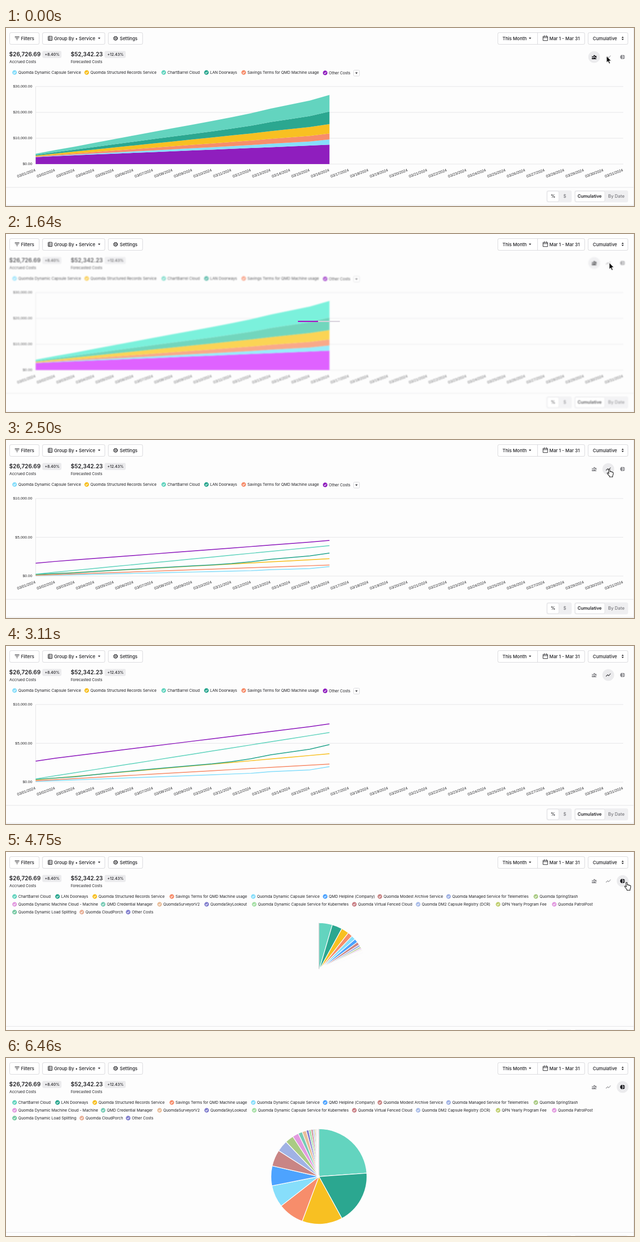
Write an HTML page that moves like this. It is 1280x365 px and loops after 6.49 s.

```html
<!DOCTYPE html>
<html lang="en">
<head>
<meta charset="utf-8">
<title>Cost report</title>
<style>
  html, body { margin: 0; width: 100%; height: 100%; overflow: hidden; background: #fdfdfd; }
  svg { display: block; width: 1280px; height: 365px; }
  text { font-family: Inter, sans-serif; font-size: 7.8px; fill: #1f1f23; white-space: pre; }
  .ui text { font-size: 9.2px; font-weight: 500; }
  .big { font-size: 11.5px; font-weight: 600; }
  .badge { font-weight: 500; }
  .axis text { font-family: "Liberation Sans", Arial, sans-serif; fill: #2a2a2d; }
  .foot text { font-size: 9px; font-weight: 500; text-anchor: middle; }
  .foot .on { font-weight: 600; }
  .foot .off { fill: #77777c; }
  .box { fill: #fff; stroke: #d8d8dc; }
  .ui .box { filter: drop-shadow(0 .8px .4px rgba(0, 0, 0, .14)); }
  .tab { fill: #fff; stroke: #e0e0e3; }
  .rule { stroke: #e4e4e6; fill: none; }
  .ink { fill: none; stroke: #1f1f23; stroke-width: 1.1; stroke-linecap: round; stroke-linejoin: round; }
  .halo { fill: #ebebed; visibility: hidden; }
  .tool { color: #8c8c90; }
  .tool.on { color: #1f1f23; }
  .tool.on .halo { visibility: visible; }
  .loading { filter: blur(1.2px); }
  .loading .soft { opacity: .72; }
  .hide { display: none; }
</style>
</head>
<body>
<svg viewBox="0 0 1280 365">
  <path class="rule" d="M1279.5 0V365"/>

  <g class="ui">
    <g class="box">
      <rect x="7.5" y="9.5" width="60" height="24" rx="3"/>
      <rect x="74.5" y="9.5" width="127" height="24" rx="3"/>
      <rect x="208.5" y="9.5" width="70" height="24" rx="3"/>
      <rect x="1002.5" y="9.5" width="177" height="24" rx="3"/>
      <rect x="1186.5" y="9.5" width="81" height="24" rx="3"/>
      <path d="M1083.5 9.5v24"/>
    </g>
    <path class="ink" d="M18.4 18.4h8.4M20.1 21.2h5M21.8 24h1.6"/>
    <rect class="ink" x="86" y="17" width="8" height="8.4" rx="1"/>
    <path class="ink" d="M88.8 17v8.4M91 19.4h1M91 21.2h1M91 23h1M86.4 19.8h2M86.4 22.6h2" style="stroke-width:.9"/>
    <circle class="ink" cx="223.4" cy="21.2" r="3.2"/>
    <circle class="ink" cx="223.4" cy="21.2" r="4.1" style="stroke-dasharray:1.6 1.62;stroke-linecap:butt"/>
    <circle class="ink" cx="223.4" cy="21.2" r="1.1" style="stroke-width:.9"/>
    <path class="ink" d="M1095 17.2h9v8.6h-9zM1095 19.8h9M1097.4 15.8v2M1101.6 15.8v2" style="stroke-width:1"/>
    <path d="M187.4 19.8h5l-2.5 2.8zM1065.6 19.8h5l-2.5 2.8zM1254.6 20.2h4.6l-2.3-2.7zM1254.6 22.3h4.6l-2.3 2.7z" fill="#1f1f23"/>
    <text x="30.4" y="24.6">Filters</text>
    <text x="98" y="24.6">Group By • Service</text>
    <text x="232" y="24.6">Settings</text>
    <text x="1012" y="24.6">This Month</text>
    <text x="1107.5" y="24.6">Mar 1 - Mar 31</text>
    <text x="1196" y="24.6">Cumulative</text>
  </g>

  <g id="main">
    <g class="soft">
      <rect x="74" y="47" width="39" height="14.5" rx="3" fill="#ebebed"/>
      <rect x="201" y="47" width="43" height="14.5" rx="3" fill="#ebebed"/>
      <text class="big" x="6.6" y="58.3">$26,726.69</text>
      <text class="big" x="132" y="58.3">$52,342.23</text>
      <text class="badge" x="79" y="57.2">+8.40%</text>
      <text class="badge" x="206.5" y="57.2">+12.43%</text>
      <text x="7" y="72.2">Accrued Costs</text>
      <text x="132" y="72.2">Forecasted Costs</text>

      <g class="tool" transform="translate(1198.8 59.5)">
        <circle class="halo" r="12"/>
        <path transform="scale(.52) translate(-12 -11.5)" d="M3 13v7h18v-1.5l-9-7L8 17zM3 7l4 3 5-7 5 4h4v8.97l-9.4-7.31-3.98 5.48L3 10.44z" fill="currentColor"/>
      </g>
      <g class="tool" transform="translate(1227.6 59.5)">
        <circle class="halo" r="12"/>
        <path transform="scale(.52) translate(-12 -12)" d="M3.5 18.49l6-6.01 4 4L22 6.92l-1.41-1.41-7.09 7.97-4-4L2 16.99z" fill="currentColor"/>
      </g>
      <g class="tool" transform="translate(1256.8 59.5)">
        <circle class="halo" r="12"/>
        <path d="M-.5 -4.6A4.6 4.6 0 0 0 -.5 4.6zM.6 -4.6A4.6 4.6 0 0 1 4.7 -.5H.6zM.6 .6H4.7A4.6 4.6 0 0 1 .6 4.6z" fill="currentColor"/>
      </g>
    </g>

    <g id="timeView">
      <g id="shortKey" class="soft">
        <rect class="box" x="708.5" y="86.5" width="12" height="12" rx="2"/>
        <path d="M711.8 91.2h5l-2.5 2.8z" fill="#1f1f23"/>
      </g>
      <g id="axis" class="axis soft"></g>
      <g id="areas"></g>
      <g id="lines" class="soft" fill="none" stroke-width="1.7" stroke-linejoin="round"></g>
    </g>
    <g id="pieView">
      <g id="fullKey"></g>
      <g id="pie" stroke="#fdfdfd" stroke-width="1.3" stroke-linejoin="round"></g>
      <path d="M638 145.5V240" stroke="#a9a9ac" stroke-width=".8"/>
    </g>

    <g id="foot" class="foot soft">
      <path class="rule" d="M0 326.8H1279M0 363.5H1279"/>
      <rect x="1101.5" y="333" width="51.5" height="24.5" rx="4" fill="#efeff1"/>
      <rect x="1158.5" y="333" width="109.5" height="24.5" rx="4" fill="#efeff1"/>
      <rect class="tab" x="1103" y="334.5" width="24" height="21.5" rx="3"/>
      <rect class="tab" x="1160" y="334.5" width="60.5" height="21.5" rx="3"/>
      <text class="on" x="1115" y="348.4">%</text>
      <text class="off" x="1139" y="348.4">$</text>
      <text class="on" x="1189.5" y="348.4">Cumulative</text>
      <text class="off" x="1244" y="348.4">By Date</text>
    </g>
  </g>

  <g id="loader">
    <rect x="595" y="178" width="85.5" height="2.4" fill="#d8d2dc"/>
    <rect id="bar" y="178" height="2.4" fill="#a30cc4"/>
  </g>

  <g id="cursor">
    <path id="arrow" d="M0 0V13.6L3.1 10.8 5.2 15.8 7.6 14.8 5.5 9.9H9.7z" fill="#111" stroke="#fff" stroke-width="1" stroke-linejoin="round"/>
    <path id="hand" d="M-1.4 1.8C-1.4 .3 1 .3 1.1 1.8L1.5 6.2C2 5.3 3.6 5.4 3.8 6.6 4.5 5.8 5.9 6.2 6 7.4 7 6.8 8.3 7.4 8.3 8.8 8.3 12 7.8 13.2 7 14.6V17H.6V15.4C-1 13.8-2.4 11.8-3.8 10-4.7 8.7-3.2 7.6-2 8.7L-.7 10z" fill="#fff" stroke="#111" stroke-width="1.1" stroke-linejoin="round"/>
  </g>
</svg>

<script>
const LOOP = 6490;
const LOADS = [[1365, 2290], [4200, 4700]];
const GROW = 1000;
const X0 = 60.5, STEP = 39.92, BASE = 279, HEIGHT = 159;

const $ = id => document.getElementById(id);
const add = (parent, tag, attrs, text) => {
  const el = document.createElementNS("http://www.w3.org/2000/svg", tag);
  for (const k in attrs) el.setAttribute(k, attrs[k]);
  if (text) el.textContent = text;
  return parent.appendChild(el);
};
const show = (el, on) => el.classList.toggle("hide", !on);
const clamp = v => Math.max(0, Math.min(1, v));
const outQuart = v => 1 - (1 - clamp(v)) ** 4;

// name, colour, legend x, legend row, slice in degrees
const services = [
  ["ChartBarrel Cloud", "#63d4bf", 17.5, 0, 86],
  ["LAN Doorways", "#2ba790", 105, 0, 65.4],
  ["Quomda Structured Records Service", "#f8c022", 181, 0, 49],
  ["Savings Terms for QMD Machine usage", "#f78d6b", 338, 0, 31.5],
  ["Quomda Dynamic Capsule Service", "#87defb", 504, 0, 26.8],
  ["QMD Helpline (Company)", "#4da3ff", 650.5, 0, 24.2],
  ["Quomda Modest Archive Service", "#c98585", 762, 0, 20],
  ["Quomda Managed Service for Telemetries", "#a0b2e4", 902, 0, 13.8],
  ["Quomda SpringStash", "#aacb84", 1080, 0, 10.3],
  ["Quomda Dynamic Machine Cloud - Machine", "#e29be0", 17.5, 1, 7.5],
  ["QMD Credential Manager", "#77cbb5", 198, 1, 5],
  ["QuomdaSurveyorV2", "#e8bd9a", 313, 1, 5],
  ["QuomdaSkyLookout", "#8380cf", 409, 1, 3.2],
  ["Quomda Dynamic Capsule Service for Kubernetes", "#a5dfa5", 506, 1, 2.8],
  ["Quomda Virtual Fenced Cloud", "#c97f85", 710, 1, 2.2],
  ["Quomda DM2 Capsule Registry (DCR)", "#a9bce8", 840, 1, 1.8],
  ["QPN Yearly Program Fee", "#c0cf70", 1003, 1, 1.5],
  ["Quomda PatrolPost", "#e29be0", 1117.5, 1, 1.2],
  ["Quomda Dynamic Load Splitting", "#77c9a4", 17.5, 2, 1],
  ["Quomda CloudPorch", "#e8b098", 154.5, 2, .9],
  ["Other Costs", "#8380cf", 249, 2, .9]
];

// colour, colour while loading, cumulative cost as [day, value] anchors; bottom of the stack first
const series = [
  ["#8f1ebe", "#df62ff", [[0, 2700], [1, 3080], [14, 7150], [15, 7516]]],
  ["#87defb", "#98ecfb", [[0, 90], [11, 1132], [12, 1340], [14, 1572], [15, 1990]]],
  ["#f78d6b", "#f9a98a", [[0, 160], [15, 2327]]],
  ["#f8c022", "#fbd455", [[0, 283], [15, 3655]]],
  ["#2ba790", "#72d6bd", [[0, 346], [2, 690], [4, 1226], [7, 1918], [9, 2358], [10, 2641], [11, 3019], [12, 3522], [14, 4245], [15, 4843]]],
  ["#63d4bf", "#7bf1dc", [[0, 409], [15, 6395]]]
];

// piecewise linear lookup
function valueAt(points, at) {
  const i = Math.max(1, points.findIndex(p => p[0] >= at));
  const [a, b] = [points[i - 1], points[i]];
  return a[1] + (b[1] - a[1]) * (at - a[0]) / (b[0] - a[0]);
}
const days = [...Array(16).keys()];
const costs = series.map(s => days.map(d => valueAt(s[2], d)));
const plot = (values, max, grow = 1) =>
  values.map((v, d) => (X0 + d * STEP).toFixed(2) + "," + (BASE - v / max * HEIGHT * grow).toFixed(2));

function addKey(parent, name, color, x, y) {
  add(parent, "circle", { cx: x, cy: y + .3, r: 4.7, fill: color });
  add(parent, "path", {
    d: `M${x - 2.2} ${y + .5}l1.5 1.5 2.9-3.1`, fill: "none", stroke: "#fff", "stroke-width": 1.1
  });
  add(parent, "text", { x: x + 7.5, y: y + 2.9 }, name);
}

for (const [name, color, x, row] of services) addKey($("fullKey"), name, color, x, 91 + row * 16);
const slices = services.map(s => add($("pie"), "path", { fill: s[1] }));

[[4, 17.5], [2, 164.5], [0, 321.5], [1, 408.5], [3, 484.5]].forEach(([i, x]) =>
  addKey($("shortKey"), services[i][0], services[i][1], x, 91));
addKey($("shortKey"), "Other Costs", "#8f1ebe", 650.5, 91.7);

// axes: one set of value labels per chart type
const axis = $("axis");
function addScale(max, parts) {
  const g = add(axis, "g", {});
  for (let i = 0; i <= parts; i++) {
    const y = BASE - HEIGHT * i / parts;
    const label = "$" + (max * i / parts).toLocaleString("en-US", { minimumFractionDigits: 2 });
    add(g, "path", { class: "rule", d: `M${X0} ${y}H1258` });
    add(g, "text", { x: 53.5, y: y + 2.2, "text-anchor": "end" }, label);
  }
  return g;
}
const areaScale = addScale(30000, 3), lineScale = addScale(10000, 2);
add(axis, "path", { class: "rule", d: `M${X0} ${BASE - HEIGHT}V${BASE}` });
for (let d = 0; d < 31; d++) {
  add(axis, "text", {
    transform: `translate(${X0 + d * STEP} 293.6) rotate(-20)`, "text-anchor": "end"
  }, `03/${String(d + 1).padStart(2, "0")}/2024`);
}

let floor = days.map(() => 0);
const areas = costs.map((c, i) => {
  const top = floor.map((v, d) => v + c[d]);
  const points = [...plot(top, 30000), ...plot(floor, 30000).reverse()].join(" ");
  floor = top;
  return add($("areas"), "polygon", { points, fill: series[i][0] });
});
const lines = series.map(s => add($("lines"), "polyline", { stroke: s[0] }));

function drawLines(grow) {
  lines.forEach((el, i) => el.setAttribute("points", plot(costs[i], 10000, grow).join(" ")));
}

function drawPie(grow) {
  const cx = 637.8, cy = 243, r = 97.8;
  const total = services.reduce((sum, s) => sum + s[4], 0);
  const point = a => `${(cx + r * Math.sin(a)).toFixed(2)} ${(cy - r * Math.cos(a)).toFixed(2)}`;
  let from = 0;
  slices.forEach((el, i) => {
    const to = from + services[i][4] / total * Math.PI * 2 * grow;
    el.setAttribute("d", `M${cx} ${cy}L${point(from)}A${r} ${r} 0 0 1 ${point(to)}Z`);
    from = to;
  });
}

// cubic-bezier(.65, .815, .735, .395)
function barEase(x) {
  const curve = (s, a, b) => 3 * (1 - s) ** 2 * s * a + 3 * (1 - s) * s * s * b + s ** 3;
  let lo = 0, hi = 1;
  for (let i = 0; i < 20; i++) {
    const mid = (lo + hi) / 2;
    if (curve(mid, .65, .735) < x) lo = mid; else hi = mid;
  }
  return curve(lo, .815, .395);
}

function drawLoader(elapsed) {
  const p = barEase(clamp(elapsed / 1260));
  const left = clamp(-.35 + 1.35 * p), right = clamp(1.9 * p);
  $("bar").setAttribute("x", 595 + 85.5 * left);
  $("bar").setAttribute("width", 85.5 * Math.max(0, right - left));
}

// time, x, y of the pointer
const track = [
  [0, 1224, 57.5], [260, 1229.5, 58.8], [2700, 1229.5, 58.8], [2950, 1290, 64],
  [3800, 1290, 66], [4030, 1265, 61.5], [LOOP, 1265, 61.5]
];
function drawCursor(t, loading) {
  const i = track.findIndex(k => k[0] > t);
  const [a, b] = [track[i - 1], track[i]];
  const u = (t - a[0]) / (b[0] - a[0]), e = u * u * (3 - 2 * u);
  const hand = !loading && ((t > 160 && t < 2760) || t > 4000);
  $("cursor").setAttribute("transform", `translate(${a[1] + (b[1] - a[1]) * e} ${a[2] + (b[2] - a[2]) * e})`);
  show($("cursor"), t < 2960 || (t > 3800 && t < 4050) || (t > 4200 && t < 5300));
  show($("hand"), hand);
  show($("arrow"), !hand);
}

const tools = document.querySelectorAll(".tool");
function draw(t) {
  const load = LOADS.find(([a, b]) => t >= a && t < b);
  const view = LOADS.filter(l => t >= l[1]).length;
  const hover = load ? -1 : t > 160 && t < 2760 ? 1 : t > 3990 && t < 5300 ? 2 : -1;

  $("main").classList.toggle("loading", !!load);
  tools.forEach((el, i) => el.classList.toggle("on", i === view || i === hover));
  show($("timeView"), view < 2);
  show($("pieView"), view === 2);
  show($("areas"), view === 0);
  show(areaScale, view === 0);
  show($("lines"), view === 1);
  show(lineScale, view === 1);
  $("foot").setAttribute("transform", `translate(0 ${view === 2 ? 30.8 : 0})`);
  areas.forEach((el, i) => el.setAttribute("fill", series[i][load ? 1 : 0]));

  if (view === 1) drawLines(outQuart((t - LOADS[0][1]) / GROW));
  if (view === 2) drawPie(outQuart((t - LOADS[1][1]) / GROW));
  show($("loader"), !!load);
  if (load) drawLoader(t - load[0]);
  drawCursor(t, !!load);
}

const start = performance.now();
function tick() {
  draw((performance.now() - start) % LOOP);
  requestAnimationFrame(tick);
}
tick();
</script>
</body>
</html>
```
